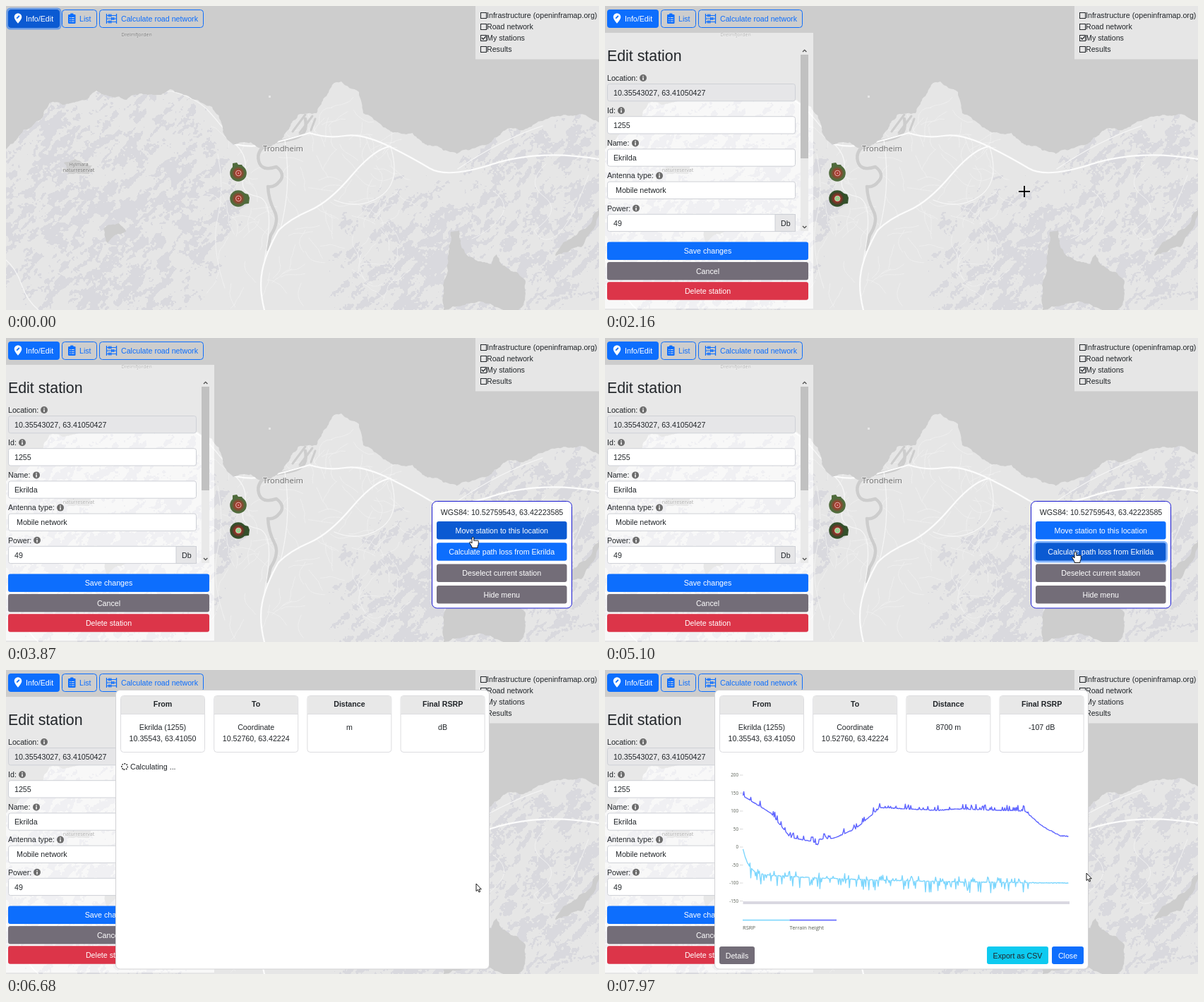
An HTML page with a canvas for the animation above (8000 ms loop, 840 px wide and 431 px high).

```html
<!DOCTYPE html>
<html lang="en">
<head>
<meta charset="utf-8">
<title>Radio planning map</title>
<style>
html, body { margin: 0; width: 100%; height: 100%; overflow: hidden; background: #cdcdcd; }
canvas, svg, #shade { position: absolute; left: 0; top: 0; width: 840px; height: 431px; }
#shade { top: 38px; width: 295px; height: 391px; background: #fff6; backdrop-filter: brightness(1.06); }
text { font: 10.67px "Liberation Sans", Arial, sans-serif; fill: #212529; white-space: pre; }
.mid { text-anchor: middle; }
.white { fill: #fff; }
.blue { fill: #0d6efd; }
.dim { fill: #a9a9b8; }
.bold { font-weight: bold; }
.head { font-size: 21.33px; }
.map { font: 11.2px "Open Sans", sans-serif; fill: #686868; stroke: #eee; stroke-width: 1.5px; paint-order: stroke; text-anchor: middle; }
.tiny { font-size: 7px; fill: #777; stroke: #ddd; stroke-width: 1px; }
.axis { font: 6.3px "Open Sans", sans-serif; fill: #555b51; text-anchor: end; }
.key { font: 7.5px "Open Sans", sans-serif; fill: #555b51; }
.line { fill: none; stroke-width: 1.4; stroke-linejoin: round; }
</style>
</head>
<body>
<canvas id="map" width="840" height="431"></canvas>
<svg id="places"></svg>
<div id="shade"></div>
<svg id="ui"></svg>
<script>
const $ = id => document.getElementById(id);
const LOOP = 8000, SITE = 'Ekrilda';
const WATER = '#cdcdcd', LAND = '#e6e6e6', BLUE = '#0d6efd', DARK = '#0b5ad2', GREY = '#736d78', EDGE = '#dcdcdf';
const mix = (a, b, k) => a + (b - a) * k;
const clamp = v => Math.min(1, Math.max(0, v));
const soft = k => k * k * (3 - 2 * k);

// ---------- map ----------
let seed = 7;
const rnd = () => (seed = seed * 16807 % 2147483647) / 2147483647;
const hash = (i, j) => { const s = Math.sin(i * 127.1 + j * 311.7) * 43758.5453; return s - Math.floor(s); };
function noise(x, y) {
  const i = Math.floor(x), j = Math.floor(y), u = soft(x - i), v = soft(y - j);
  return mix(mix(hash(i, j), hash(i + 1, j), u), mix(hash(i, j + 1), hash(i + 1, j + 1), u), v);
}

// Path through "x y" pairs whose legs are broken up by midpoint displacement.
function rough(list, end = 'Z', amp = .28) {
  const n = list.split(' ').map(Number), out = [[n[0], n[1]]];
  const split = (a, b, c, d) => {
    if (Math.hypot(c - a, d - b) < 4) return out.push([c, d]);
    const r = (rnd() - .5) * amp, x = (a + c) / 2 - (d - b) * r, y = (b + d) / 2 + (c - a) * r;
    split(a, b, x, y);
    split(x, y, c, d);
  };
  for (let i = 2; i < n.length; i += 2) split(n[i - 2], n[i - 1], n[i], n[i + 1]);
  return new Path2D('M' + out.join('L') + end);
}

function drawMap() {
  const coast = rough('0 203 25 175 50 160 62 137 128 120 215 126 232 118 292 143 322 196 370 203 414 154 440 152 462 112 475 107 500 122 506 152 530 167 576 180 590 194 620 205 657 204 686 194 715 173 760 163 840 165', 'V431H0Z');
  const lakes = ['630 320 642 318 655 355 688 366 695 352 735 388 726 431 620 431 630 320', '840 288 815 342 778 354 808 325 840 288',
    '138 316 160 308 170 320 144 336 138 316', '82 222 98 217 122 226 118 238 88 238 82 222'].map(s => rough(s));
  const river = new Path2D('M424 160Q428 182 410 187T372 194Q354 205 358 220T383 228Q396 238 388 248T371 256Q372 275 380 290T375 325L370 345');
  const piers = new Path2D('M406 178L424 154M416 180L434 156M432 176L438 160');
  const highways = new Path2D('M366 431Q358 400 363 375T386 318Q402 302 430 290T490 240T545 199M325 196Q350 202 380 194T430 180Q455 188 480 184T545 200Q575 215 600 230T690 224T840 217');
  const roads = new Path2D('M128 121T235 121Q270 130 288 150T325 196Q345 215 337 240T356 270T366 360M395 190Q402 240 396 280T385 320M545 200Q560 250 530 270T465 275M0 360Q14 372 22 395T46 431M640 231Q700 190 760 170');
  const lanes = new Path2D('M765 224Q735 250 762 270T748 318Q760 340 780 325T825 240M690 262Q715 280 700 300T660 330M300 210Q310 260 300 300T310 400');

  const g = $('map').getContext('2d');
  const stroke = (path, color, w) => { g.strokeStyle = color; g.lineWidth = w; g.stroke(path); };
  g.lineCap = g.lineJoin = 'round';
  g.fillStyle = WATER;
  g.fillRect(0, 0, 840, 431);
  g.fillStyle = LAND;
  g.fill(coast);
  g.fillRect(372, 127, 3, 3);
  g.save();
  g.clip(coast);

  // woods: streaky noise inside a few hill areas [cx, cy, rx, ry]
  const hills = [[140, 270, 200, 200], [600, 370, 150, 135], [775, 290, 150, 150]];
  const layer = new OffscreenCanvas(840, 431), lg = layer.getContext('2d'), img = lg.createImageData(840, 431);
  for (let y = 110; y < 431; y++) for (let x = 0; x < 840; x++) {
    const m = Math.max(...hills.map(([a, b, c, d]) => 1 - ((x - a) / c) ** 2 - ((y - b) / d) ** 2));
    if (m < 0) continue;
    const a = (x - y) * .7, b = (x + y) * .7;
    const n = noise(a / 20, b / 9) * .45 + noise(a / 8, b / 4) * .33 + noise(x / 2.5, y / 2.5) * .22;
    if (n > .66 - .14 * Math.min(1, m * 2)) img.data.set([217, 217, 222, 255], (y * 840 + x) * 4);
  }
  lg.putImageData(img, 0, 0);
  g.drawImage(layer, 0, 0);

  // side streets as short random walks
  for (let i = 0; i < 130; i++) {
    let x = 300 + rnd() * 260, y = 140 + rnd() * 260, dir = rnd() * 6.3;
    const street = new Path2D();
    street.moveTo(x, y);
    for (let k = 0; k < 5; k++) {
      dir += rnd() - .5;
      street.lineTo(x += Math.cos(dir) * 7, y += Math.sin(dir) * 7);
    }
    stroke(street, '#f0f0f0', .8);
  }
  g.fillStyle = WATER;
  for (const lake of lakes) g.fill(lake);
  stroke(river, WATER, 4.5);
  stroke(piers, WATER, 3);
  stroke(lanes, '#f2f2f2', .9);
  stroke(roads, '#f6f6f6', 1.2);
  stroke(highways, '#fcfcfc', 2.2);
  g.restore();
}

// ---------- interface ----------
const text = (x, y, s, c = '', id = '') => `<text x="${x}" y="${y}" class="${c}" id="${id}">${s}</text>`;
const rect = (x, y, w, h, fill, more = '') => `<rect x="${x}" y="${y}" width="${w}" height="${h}" fill="${fill}" ${more}/>`;
const circle = (x, y, r, fill, more = '') => `<circle cx="${x}" cy="${y}" r="${r}" fill="${fill}" ${more}/>`;
const path = (d, more) => `<path d="${d}" ${more}/>`;
const group = (id, s) => `<g id="${id}">${s}</g>`;
const rows = (n, f) => Array.from({ length: n }, (_, i) => f(i)).join('');
const button = (x, y, w, h, fill, s, c = 'white', id = '') =>
  rect(x, y, w, h, fill, `rx="3" id="${id}"`) + text(x + w / 2, y + h / 2 + 4, s, c + ' mid');
const ring = (id, x, y, w, h) => rect(x - 1.3, y - 1.3, w + 2.6, h + 2.6, 'none', `id="${id}" rx="4.5" stroke="${BLUE}" stroke-opacity=".5" stroke-width="2.6"`);
const outline = (x, w) => rect(x, 5.5, w, 25, 'none', `rx="4" stroke="${BLUE}"`);

const toolbar = ring('infoRing', 3, 5, 73, 26) + rect(3, 5, 73, 26, BLUE, 'rx="4" id="info"') +
  path('M17 10.3a5.3 5.3 0 0 0-5.3 5.3c0 3.8 5.3 9.2 5.3 9.2s5.3-5.4 5.3-9.2a5.3 5.3 0 0 0-5.3-5.3z', 'fill="#fff"') +
  path('M15.2 17.6l3.6-3.6', `stroke="${BLUE}" stroke-width="1.8"`) + text(28, 22, 'Info/Edit', 'white') +
  outline(79.5, 49) + rect(88, 12, 10.5, 13, BLUE, 'rx="1.2"') + rect(91, 10.5, 4.5, 3, BLUE, 'rx="1"') +
  rows(3, i => path(`M90 ${16.5 + i * 2.8}h1.5m1.2 0h4`, 'stroke="#ddd"')) + text(104, 22, 'List', 'blue') +
  outline(132.5, 147) + path('M142.5 11v14M156.5 11v14', `stroke="${BLUE}" stroke-width="1.3"`) +
  rows(3, i => path(`M142 ${13.5 + i * 4.5}h15`, `stroke="${BLUE}"`) +
    path(`M${146 + i % 2 * 4} ${11.5 + i * 4.5}v4m2.500-4v4`, `stroke="${BLUE}" stroke-width="1.7"`)) +
  text(163, 22, 'Calculate road network', 'blue');

const layers = rect(665, 0, 175, 75.5, '#fff', 'opacity=".5"') +
  ['Infrastructure (openinframap.org)', 'Road network', 'My stations', 'Results'].map((s, i) =>
    rect(672.5, 9.5 + i * 16, 8, 8, 'none', 'stroke="#212529"') + text(681, 17 + i * 16, s)).join('') +
  path('M674 45l2 2.3 3.6-4.5', 'fill="none" stroke="#212529" stroke-width="1.3"');

const station = (y, bump, rim, core, dot) => path(bump, `fill="${rim}"`) + circle(329, y, 11.8, rim) +
  circle(329, y, 9.5, `url(#${core})`) + circle(329.3, y, 3.8, dot, 'stroke="#e0b8b0"') + circle(329.3, y, 1, '#d9a79c');
const lower = 'M336 265l7 2 2 5-1 8-8 1z';
const fade = (id, a, b) => `<radialGradient id="${id}"><stop offset=".45" stop-color="${a}"/><stop offset="1" stop-color="${b}"/></radialGradient>`;
const stations = fade('red', '#a03a2c', '#506b3c') + fade('deep', '#9a3026', '#34452a') +
  station(237, 'M321 230v-7l6-1 2 3h5l3 6z', '#506b3c', 'red', '#a8382f') +
  group('idle', station(273, lower, '#506b3c', 'red', '#a8382f')) +
  group('picked', station(273, lower, '#34502a', 'deep', '#8fd88c'));

const field = (i, label, iconX, value, x = 12) => {
  const y = 110.5 + i * 46.2;
  return text(3, y - 4.7, label) + circle(iconX, y - 8.5, 5, '#6c6c6c') +
    path(`M${iconX} ${y - 9.3}v3.8m0-6.1v1.4`, 'stroke="#fff" stroke-width="1.5"') +
    rect(3.5, y, 266, 24.3, i ? '#fff' : '#e6e6e8', 'rx="3" stroke="#ced0d6"') + text(x, y + 16.2, value);
};
const form = text(3, 78, 'Edit station', 'head') +
  field(0, 'Location:', 54, '10.35543027, 63.41050427') + field(1, 'Id:', 23, '1255') + field(2, 'Name:', 43, SITE) +
  field(3, 'Antenna type:', 77, 'Mobile network', 15) + field(4, 'Power:', 44, '49') +
  rect(241, 295.5, 28.5, 24, '#e6e6e8', 'stroke="#ced0d6"') + text(249, 311.5, 'Db') +
  rect(277, 58, 11, 261, '#e9e9e9') + rect(277, 69, 11, 147, '#c1c1c1') +
  path('M280 65l2.7-2.7 2.7 2.7M280 312l2.7 2.7 2.7-2.7', 'fill="none" stroke="#505050" stroke-width="1.3"') +
  button(3, 334.5, 285, 25.5, BLUE, 'Save changes') + button(3, 363, 285, 25.5, GREY, 'Cancel') +
  button(3, 391.3, 285, 25.5, '#dc3549', 'Delete station');

const option = (i, ...rest) => button(610, 260 + i * 30.3, 184.5, 25.5, ...rest);
const menu = rect(603.5, 231.5, 198, 151.5, '#fff', 'rx="7" stroke="#1a1ad0"') +
  text(702.5, 251, 'WGS84: 10.52759543, 63.42223585', 'mid') + ring('pathRing', 610, 290.3, 184.5, 25.5) +
  option(0, BLUE, 'Move station to this location', 'white', 'move') +
  option(1, BLUE, 'Calculate path loss from ' + SITE, 'white', 'loss') +
  option(2, GREY, 'Deselect current station') + option(3, GREY, 'Hide menu');

const card = (i, title, first, second = '', id = '') => {
  const x = 162.5 + i * 132.2, mid = x + 59.5;
  return rect(x, 36.5, 119, 80, '#fff', `rx="4" stroke="${EDGE}"`) + rect(x + .5, 37, 118, 25, '#e8e8e8') +
    path(`M${x} 62.5h119`, `stroke="${EDGE}"`) + text(mid, 52, title, 'mid bold') +
    text(mid, 84.5, first, 'mid', id) + text(mid, 100.5, second, 'mid');
};
const legend = (x, color, s) => rect(x, 353.8, 66.5, 1.6, color) + text(x, 367.5, s, 'key');
const modal = rect(155.5, 28.5, 529, 395.5, '#fff', 'rx="6" stroke="#d2d2d4"') +
  card(0, 'From', SITE + ' (1255)', '10.35543, 63.41050') + card(1, 'To', 'Coordinate', '10.52760, 63.42224') +
  card(2, 'Distance', 'm', '', 'dist') + card(3, 'Final RSRP', 'dB', '', 'rsrp') +
  group('busy', circle(168, 137, 4.2, 'none', 'id="spin" stroke="#333" stroke-width="1.7" stroke-dasharray="1.8 1.5"') + text(176, 141, 'Calculating ...')) +
  group('result', group('ticks', '') + rect(195.5, 328, 462.5, 4, '#d9d8e1') +
    path('', 'id="signal" class="line" stroke="#7cd6fd"') + path('', 'id="terrain" class="line" stroke="#5e64ff"') +
    legend(195, '#7cd6fd', 'RSRP') + legend(261.5, '#5e64ff', 'Terrain height') +
    button(162, 392, 50, 25, GREY, 'Details') + button(541, 392, 87, 25, '#0dcaf0', 'Export as CSV', '') + button(633, 392, 45, 25, BLUE, 'Close'));

const tip = rect(0, 0, 90, 28, '#25252f') + text(7, 18, `Station (${SITE})`, 'dim');
const outlined = 'fill="#fff" stroke="#000" stroke-width=".9"';
const cursors = group('cross', path('M-8 0H8M0-8V8', 'stroke="#000" stroke-width="1.8"')) +
  group('arrow', path('M0 0v10.5l2.4-2.1 1.6 3.6 1.7-.8-1.6-3.4h3.2z', outlined)) +
  group('hand', path('M-1 1v8l-2-2q-2 0-1 2l3 5v1.5h8v-2l1.2-3v-5q-1-1.2-2.2 0-1-1.2-2 0-1-1.2-2.2 0v-4.5q-1.3-1.7-2.8 0z', outlined));

$('places').innerHTML = text(392.5, 206, 'Trondheim', 'map') + text(103, 226.5, 'Hylmara', 'map tiny') +
  text(103, 235, 'naturreservat', 'map tiny') + `<g font-style="italic">${text(185, 43, 'Drelmfjorden', 'map tiny')}</g>`;
$('ui').innerHTML = toolbar + layers + stations + group('form', form) + group('menu', menu) + group('modal', modal) + group('tip', tip) + group('cursor', cursors);

// ---------- chart ----------
const ground = [[195, 178], [235, 203], [262, 237], [297, 244], [301, 251], [304, 240], [325, 238], [355, 225], [390, 195], [470, 199], [500, 197], [595, 200], [620, 222], [645, 235], [658, 236]];
function groundAt(x) {
  const i = Math.max(1, ground.findIndex(p => p[0] >= x)), [a, b] = ground[i - 1], [c, d] = ground[i];
  return mix(b, d, (x - a) / (c - a));
}
const xs = Array.from({ length: 420 }, (_, i) => 195.5 + i * 1.1);
const heights = xs.map(x => groundAt(x) + rnd() - .5 - (rnd() < .24 && x < 600 ? 2 + rnd() * 6 : 0));
const powers = xs.map(x => {
  const d = x - 195, r = d > 10 && d < 411 ? rnd() : 1;
  return 303 - 37 * Math.exp(-d / 8) - 15 * Math.exp(-d / 200) + (r < .22 ? 3 + rnd() * 13 : r < .36 ? -2 - rnd() * 5 : rnd());
});
const FLOOR = 327.5;
const curve = (ys, k) => 'M' + xs.map((x, i) => x.toFixed(1) + ' ' + mix(FLOOR, ys[i], k).toFixed(1)).join('L');

function drawChart(t) {
  const k = 1 - (1 - clamp((t - 7270) / 350)) ** 4, started = t >= 7270;
  $('terrain').setAttribute('d', curve(heights, k));
  $('signal').setAttribute('d', curve(powers, k));
  $('ticks').innerHTML = rows(started ? 8 : 6, i => {
    const y = mix(FLOOR - Math.min(i, 5) * 35.7, FLOOR - i * 25.5, k);
    return path(`M191 ${y}h4.5`, 'stroke="#dadada"') + text(189, y + 2.2, started ? i * 50 - 150 : i, 'axis');
  });
}

// ---------- timeline ----------
// cursor legs: [start, end, x, y]
const legs = [[330, 1110, 333, 274], [1680, 2160, 594, 263], [2160, 2460, 608, 233], [2460, 2620, 602, 231],
  [3510, 3870, 661, 282], [3870, 4170, 666, 303], [7600, 7970, 682, 288]];
const cursorAt = t => legs.reduce(([x, y], [from, to, nx, ny]) => {
  const k = soft(clamp((t - from) / (to - from)));
  return [mix(x, nx, k), mix(y, ny, k)];
}, [822, 228]);
const show = (id, on) => $(id).style.display = on ? '' : 'none';
const move = (id, x, y) => $(id).setAttribute('transform', `translate(${x} ${y})`);

function draw(t) {
  const [x, y] = cursorAt(t);
  const editing = t >= 1420, picked = t >= 1480, menuOpen = t >= 3180 && t < 5630, modalOpen = t >= 5630, done = t >= 6710;
  const over = (top, bottom) => menuOpen && x > 610 && y > top && y < bottom;
  const onMove = over(260, 285.5), onLoss = over(290, 316);

  $('info').setAttribute('fill', editing ? BLUE : DARK);
  show('infoRing', !editing);
  show('shade', editing);
  show('form', editing);
  show('idle', !picked);
  show('picked', picked);

  show('tip', t >= 1080 && t < 1740);
  const drift = 2 * clamp((t - 1170) / 90);
  move('tip', 335 + drift, 277 + drift);

  show('menu', menuOpen);
  $('move').setAttribute('fill', onMove ? DARK : BLUE);
  $('loss').setAttribute('fill', onLoss ? DARK : BLUE);
  show('pathRing', t >= 5100);

  show('modal', modalOpen);
  show('busy', !done);
  show('result', done);
  $('spin').setAttribute('transform', `rotate(${t * .18} 168 137)`);
  $('dist').textContent = done ? '8700 m' : 'm';
  $('rsrp').textContent = done ? '-107 dB' : 'dB';
  if (done) drawChart(t);

  const hand = onMove || onLoss, arrow = !hand && (modalOpen || menuOpen && x > 604 && y > 232);
  show('cursor', t >= 330);
  show('hand', hand);
  show('arrow', arrow);
  show('cross', !hand && !arrow);
  move('cursor', x, y);
}

drawMap();
let start;
function tick(now) {
  start ??= now;
  draw((now - start) % LOOP);
  requestAnimationFrame(tick);
}
draw(0);
requestAnimationFrame(tick);
</script>
</body>
</html>
```
